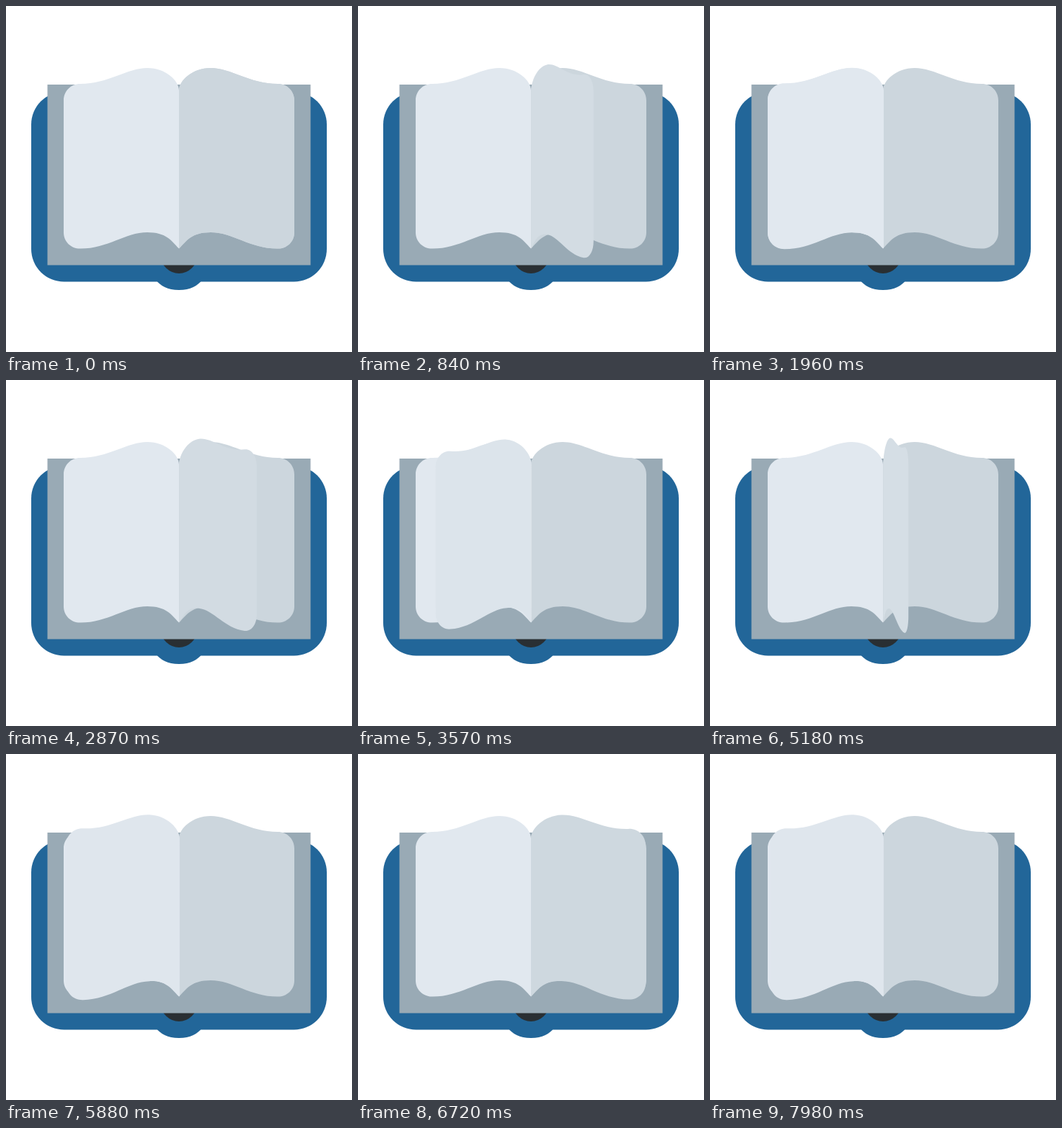
Write an HTML page that moves like this. It is 480 px wide and 480 px high and loops after 8000 ms.

```html
<!DOCTYPE html>
<html lang="en">
<head>
<meta charset="utf-8">
<title>Open book</title>
<style>
  html, body { margin: 0; height: 100%; overflow: hidden; background: #fff; }
  svg { display: block; width: 100vw; height: 100vh; }
</style>
</head>
<body>
<svg viewBox="0 0 480 480">
  <rect x="35" y="119" width="410" height="263.5" rx="45.5" fill="#269"/>
  <path d="M208 380C214 388 224 394 240 394S266 388 272 380Z" fill="#269"/>
  <circle cx="240" cy="345.7" r="25.3" fill="#292f33"/>
  <rect x="57.5" y="109" width="365" height="250.5" fill="#99aab5"/>
  <path id="left" fill="#e1e8ef"/>
  <path id="right" fill="#ccd6dd"/>
  <path id="leaf"/>
</svg>
<script>
const LOOP = 8000, STEP = 70, TURN = 2100, DELAY = 15;
const SPINE = 240, EYE_Y = 224, EYE_DISTANCE = 1200;
const RIGHT_COLOR = [204, 214, 221], LEFT_COLOR = [225, 232, 239];

// Page outline as a cubic path; x is the distance from the spine.
const PAGE = `M0 117C0 104 18 86 44 86C72 86 98 108 137 108
  C150 108 160 118 160 131L160 314C160 327 150 336.6 137 336.6
  C98 336.6 75 314 44 314C18 314 11 325 0 336.6Z`;

// Outline of the page turned about the spine, seen in perspective.
function turnedPage(angle, spine = SPINE) {
  return PAGE.replace(/([\d.]+) ([\d.]+)/g, (_, x, y) => {
    const scale = EYE_DISTANCE / (EYE_DISTANCE - x * Math.sin(angle));
    const px = spine + x * Math.cos(angle) * scale;
    const py = EYE_Y + (y - EYE_Y) * scale;
    return `${px.toFixed(2)} ${py.toFixed(2)}`;
  });
}

const byId = id => document.getElementById(id);
const leaf = byId('leaf');
byId('right').setAttribute('d', turnedPage(0));
byId('left').setAttribute('d', turnedPage(Math.PI));

function draw(now) {
  const time = Math.floor(now % LOOP / STEP) * STEP;
  const t = Math.max(0, time % TURN - DELAY) / TURN;
  const progress = t * t * (3 - 2 * t);
  const color = RIGHT_COLOR.map((c, i) => Math.round(c + (LEFT_COLOR[i] - c) * progress));
  leaf.setAttribute('d', turnedPage(progress * Math.PI, SPINE + progress));
  leaf.setAttribute('fill', `rgb(${color})`);
}

const start = performance.now();
function tick() {
  draw(performance.now() - start);
  requestAnimationFrame(tick);
}
tick();
</script>
</body>
</html>
```
